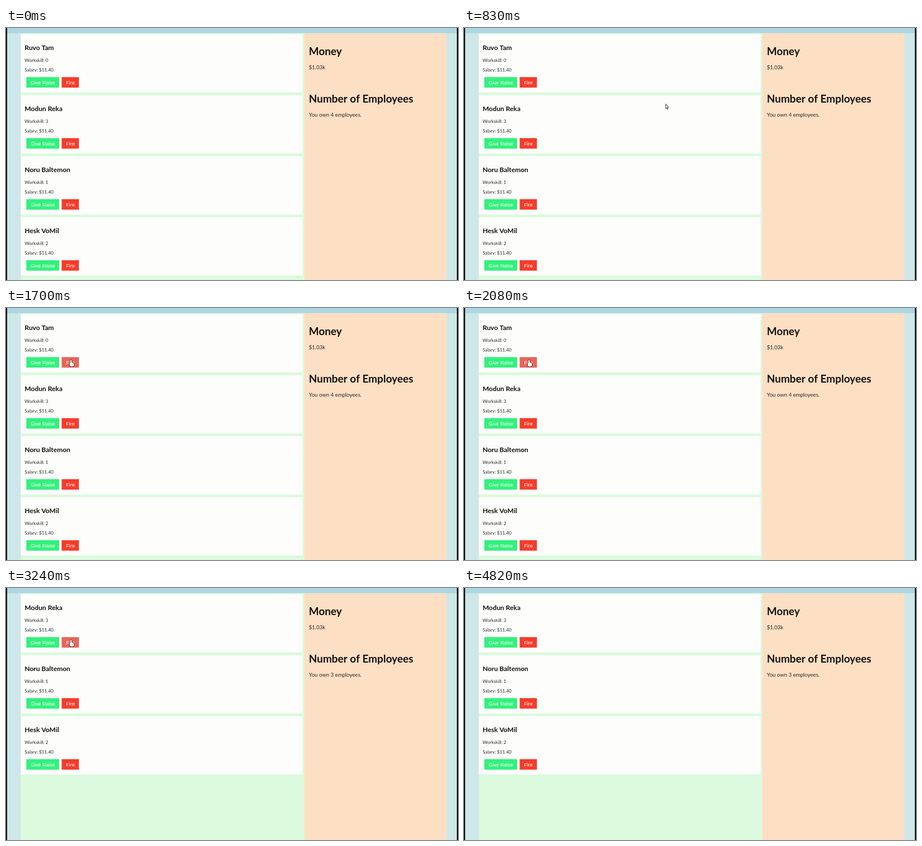
An HTML page with a canvas that plays this animation: 800x446 px, repeating every 4900 ms.

```html
<!DOCTYPE html>
<html lang="en">
<head>
<meta charset="utf-8">
<title>Employee manager</title>
<style>
  html, body { margin: 0; width: 100%; height: 100%; overflow: hidden; background: #dcfadd; }
  canvas { display: block; width: 800px; height: 446px; }
</style>
</head>
<body>
<canvas id="stage" width="800" height="446"></canvas>
<script>
const ctx = document.getElementById('stage').getContext('2d');

const LOOP = 4900;
const FIRED = 2350;
const ENTER = { start: 506, duration: 800 };
const LEAVE = { start: 4380, duration: 420 };
const CARD_PITCH = 108;
const FIRE = { x: 98.5, y: 87, w: 30.5, h: 18.5 };

const COLORS = {
  page: '#dcfadd', strip: '#cee7e8', bar: '#abd6e2', panel: '#fddfc4', edge: '#0c100c',
  card: '#fdfdfc', raise: '#32f17d', fire: '#f63c2b', fireHover: '#e9645a',
  ink: '#12110f', soft: '#2b2927', pale: '#fffaf4'
};

const employees = [
  { name: 'Ruvo Tam', skill: 0 },
  { name: 'Modun Reka', skill: 3 },
  { name: 'Noru Baltemon', skill: 1 },
  { name: 'Hesk VoMil', skill: 2 }
];

const progress = (t, { start, duration }) => Math.min(1, Math.max(0, (t - start) / duration));
const mix = (a, b, u) => a + (b - a) * u;

// One decelerating stroke to the button, a rest, one accelerating stroke away.
function pointerAt(t) {
  if (t < ENTER.start || t > LEAVE.start + LEAVE.duration) return null;
  const near = (1 - progress(t, ENTER)) ** 2;
  const away = progress(t, LEAVE) ** 2;
  return {
    x: mix(mix(114, 802, near), 620, away),
    y: mix(mix(92, 211, near), -16, away)
  };
}

function isOverFire(p) {
  return p !== null && p.x >= FIRE.x && p.x <= FIRE.x + FIRE.w &&
    p.y >= FIRE.y && p.y <= FIRE.y + FIRE.h;
}

function rect(x, y, w, h, color) {
  ctx.fillStyle = color;
  ctx.fillRect(x, y, w, h);
}

function text(str, x, y, font, color) {
  ctx.font = font;
  ctx.fillStyle = color;
  ctx.fillText(str, x, y);
}

const lato = (size, weight = 400) => `${weight} ${size}px Lato, sans-serif`;
const buttonFont = '8.9px "Liberation Sans", Arial, sans-serif';

function drawCard({ name, skill }, y, hovered) {
  rect(26, y + 11, 499, 103, COLORS.card);
  text(name, 33, y + 39, lato(11.9, 700), COLORS.ink);
  text(`Workskill: ${skill}`, 33, y + 60, lato(8.1), COLORS.soft);
  text('Salary: $11.40', 33, y + 77, lato(8.15), COLORS.soft);
  rect(36, y + 87, 58, 18.5, COLORS.raise);
  text('Give Raise', 43.5, y + 99.5, buttonFont, COLORS.pale);
  rect(FIRE.x, y + FIRE.y, FIRE.w, FIRE.h, hovered ? COLORS.fireHover : COLORS.fire);
  text('Fire', 106.3, y + 99.5, buttonFont, COLORS.pale);
}

function drawArrow() {
  const shape = new Path2D('M.5 .5V8.5L2.2 7 3.3 9.8 4.7 9.2 3.6 6.5H5.7Z');
  ctx.fill(shape);
  ctx.stroke(shape);
}

function drawHand() {
  ctx.beginPath();
  ctx.roundRect(0, 0, 2.2, 8, 1);
  ctx.roundRect(-1, 4.5, 7, 7, 2);
  ctx.stroke();
  ctx.fill();
}

function drawPointer({ x, y }, hand) {
  ctx.save();
  ctx.translate(x, y);
  ctx.fillStyle = '#fffffb';
  ctx.strokeStyle = '#22221e';
  ctx.lineWidth = hand ? 1.4 : 0.9;
  ctx.lineJoin = 'round';
  if (hand) drawHand(); else drawArrow();
  ctx.restore();
}

function drawPage() {
  rect(0, 0, 800, 446, COLORS.strip);
  rect(26, 9, 502, 437, COLORS.page);
  rect(528, 9, 251.5, 437, COLORS.panel);
  rect(0, 0, 800, 9, COLORS.bar);
  rect(0, 0, 2, 446, COLORS.edge);
  rect(798, 0, 2, 446, COLORS.edge);
}

function drawSummary(count) {
  text('Money', 536, 47.5, lato(18.8, 700), COLORS.ink);
  text('$1.03k', 536, 73, lato(9.5), COLORS.soft);
  text('Number of Employees', 536, 131.5, lato(18.8, 700), COLORS.ink);
  text(`You own ${count} employees.`, 536, 157, lato(9.5), COLORS.soft);
}

function draw(t) {
  const staff = t < FIRED ? employees : employees.slice(1);
  const pointer = pointerAt(t);
  const hovered = isOverFire(pointer);

  drawPage();
  staff.forEach((person, i) => drawCard(person, i * CARD_PITCH, hovered && i === 0));
  drawSummary(staff.length);
  if (pointer) drawPointer(pointer, hovered);
}

const start = performance.now();
function tick() {
  draw((performance.now() - start) % LOOP);
  requestAnimationFrame(tick);
}
tick();
</script>
</body>
</html>
```
